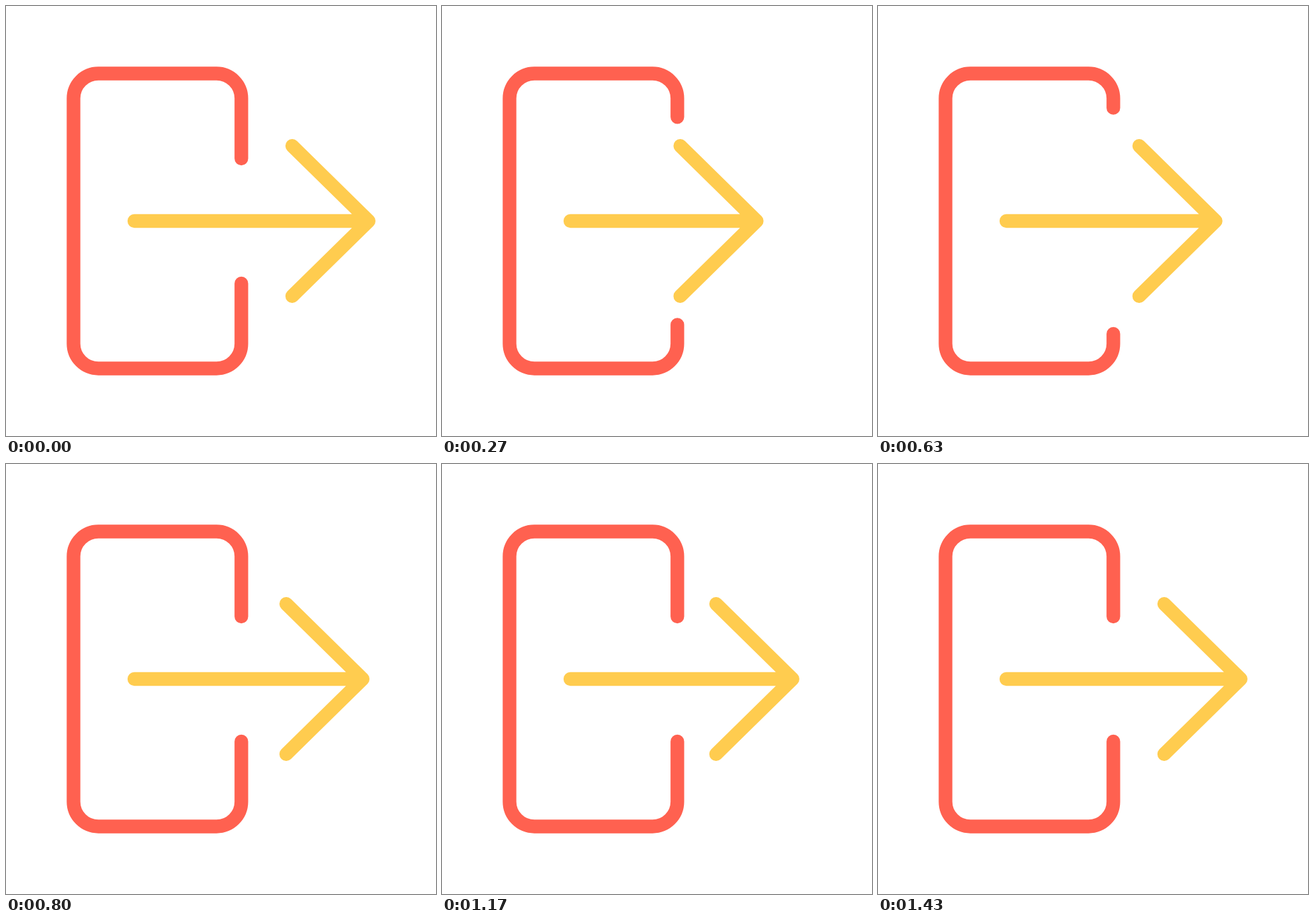
These frames come from a looping animation (640 px wide and 640 px high, 2 s). An HTML page with a canvas:

```html
<!DOCTYPE html>
<html lang="en">
<head>
<meta charset="utf-8">
<title>Exit icon</title>
<style>
  html, body { margin: 0; width: 100%; height: 100%; overflow: hidden; background: #fff; }
  canvas { display: block; width: 640px; height: 640px; }
</style>
</head>
<body>
<canvas id="stage" width="640" height="640"></canvas>
<script>
const ctx = document.getElementById('stage').getContext('2d');
const LOOP = 2000;
const RED = '#ff6150', YELLOW = '#ffcc4f';

// Keys are [frame, value] at 30 frames per second.
const ARROW_SHIFT = [[0, 0], [14, -117.7], [22, 0], [30, -57], [38, 0], [41, 3], [43, 0]];
const DOOR_TRIM = [[5, 0], [14, 238], [22, 0]];

const door = { left: 100.5, right: 350.3, top: 100.5, bottom: 539.5, radius: 37, gapTop: 227, gapBottom: 413 };
const doorLength =
  2 * (door.right - door.left - 2 * door.radius) +
  (door.bottom - door.top - 2 * door.radius) +
  (door.gapTop - door.top - door.radius) +
  (door.bottom - door.gapBottom - door.radius) +
  2 * Math.PI * door.radius;

const ease = u => u * u * (3 - 2 * u);

function valueAt(keys, frame) {
  if (frame <= keys[0][0]) return keys[0][1];
  for (let i = 1; i < keys.length; i++) {
    const [start, from] = keys[i - 1], [end, to] = keys[i];
    if (frame <= end) return from + (to - from) * ease((frame - start) / (end - start));
  }
  return keys[keys.length - 1][1];
}

// Shortens the open door outline by the same length at both ends.
function drawDoor(trim) {
  const { left, right, top, bottom, radius, gapTop, gapBottom } = door;
  ctx.strokeStyle = RED;
  ctx.setLineDash(trim ? [doorLength - 2 * trim, doorLength] : []);
  ctx.lineDashOffset = -trim;
  ctx.beginPath();
  ctx.moveTo(right, gapTop);
  ctx.arcTo(right, top, left, top, radius);
  ctx.arcTo(left, top, left, bottom, radius);
  ctx.arcTo(left, bottom, right, bottom, radius);
  ctx.arcTo(right, bottom, right, gapBottom, radius);
  ctx.lineTo(right, gapBottom);
  ctx.stroke();
  ctx.setLineDash([]);
}

function drawArrow(shift) {
  const tip = 539.8 + shift, wing = 426 + shift;
  ctx.strokeStyle = YELLOW;
  ctx.beginPath();
  ctx.moveTo(191, 320);
  ctx.lineTo(tip, 320);
  ctx.moveTo(wing, 208.2);
  ctx.lineTo(tip, 320);
  ctx.lineTo(wing, 431.8);
  ctx.stroke();
}

function draw(now) {
  // Frame starts fall on whole hundredths of a second.
  const hundredths = Math.floor((now % LOOP) / 10);
  const frame = Math.floor((hundredths + 0.5) * 0.3);

  ctx.fillStyle = '#fff';
  ctx.fillRect(0, 0, 640, 640);
  ctx.lineWidth = 20.3;
  ctx.lineCap = ctx.lineJoin = 'round';
  drawDoor(valueAt(DOOR_TRIM, frame));
  drawArrow(valueAt(ARROW_SHIFT, frame));
}

const startTime = performance.now();
function tick() {
  draw(performance.now() - startTime);
  requestAnimationFrame(tick);
}
tick();
</script>
</body>
</html>
```
